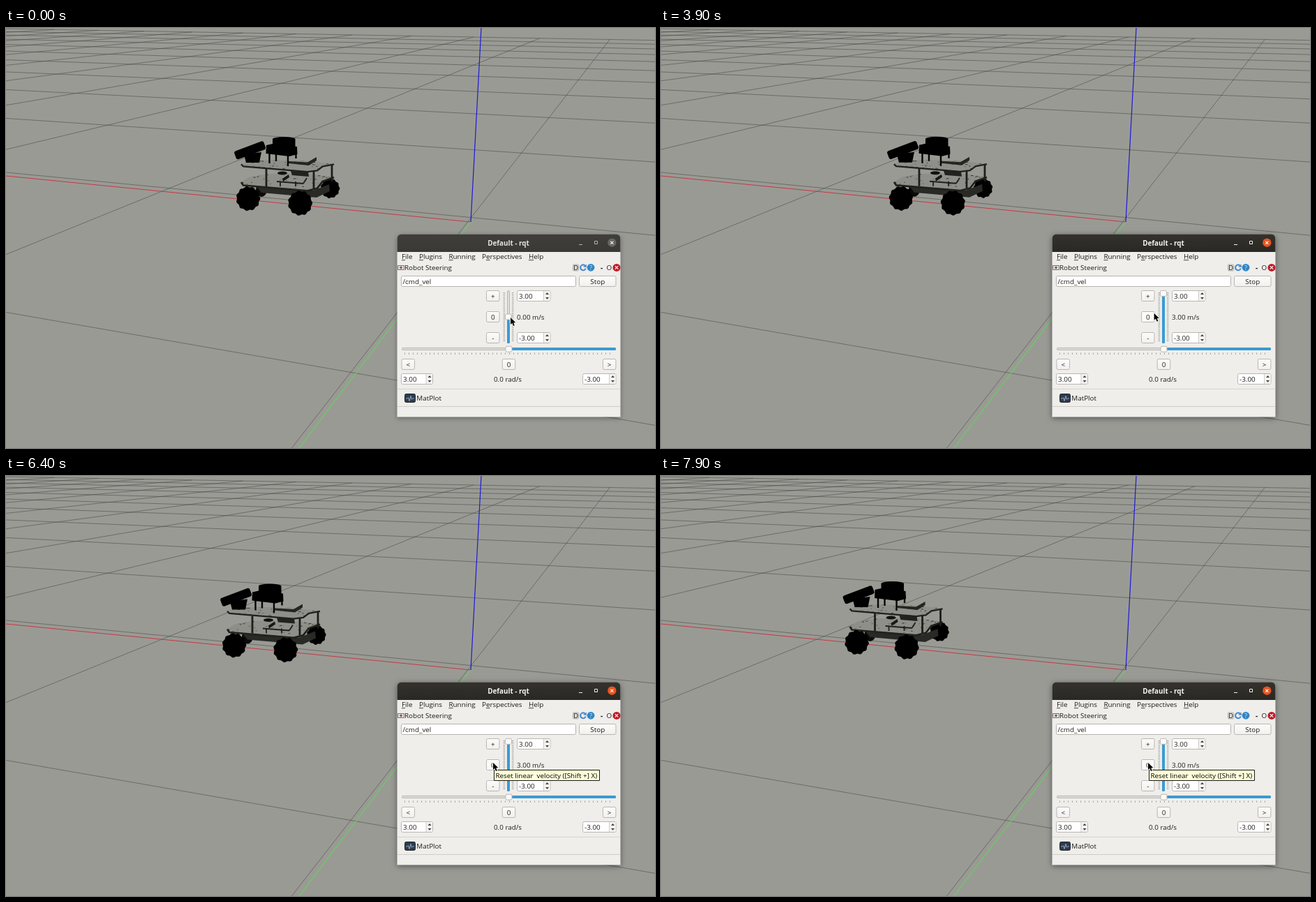
Animation of 930x602 px, one loop 8 s. Source, as an HTML page with a canvas:

```html
<!DOCTYPE html>
<html lang="en">
<head>
<meta charset="utf-8">
<title>Robot steering</title>
<style>
html, body { margin: 0; width: 100%; height: 100%; overflow: hidden; background: #9a9a95; }
canvas { display: block; }
</style>
</head>
<body>
<canvas id="stage" width="930" height="602"></canvas>
<script>
const g = document.getElementById('stage').getContext('2d');
const LOOP = 8000;
const BODY = '#efeeeb', BLUE = '#3a9bd2', INK = '#1c1c18', EDGE = '#b9b7b2';

const ramp = (t, from, to) => Math.min(1, Math.max(0, (t - from) / (to - from)));
const mix = (a, b, k) => a + (b - a) * k;

// creeps forward as a cubic, then cruises while losing pace
function driveAt(t) {
  const s = t / 1000, u = s - 6.4;
  return u < 0 ? -.0513 * s ** 3 : -(20 + 43.2 * u - 8.15 * u * u);
}

const speedAt = t => t < 2400 ? 2.7 * ramp(t, 1100, 1300) : 3;

// drags the slider, lets go, then glides to the zero button
function pointerAt(t) {
  if (t < 3400) {
    const v = speedAt(t);
    return [723 - 2 * v, 415 - 11 * v];
  }
  if (t < 3700) return [723, 406];
  const k = ramp(t, 3800, 4500);
  return [mix(708, 698, k), mix(408.5, 411, k)];
}

function line(x1, y1, x2, y2, color, width = 1) {
  g.strokeStyle = color;
  g.lineWidth = width;
  g.beginPath();
  g.moveTo(x1, y1);
  g.lineTo(x2, y2);
  g.stroke();
}

function trace(points) {
  g.beginPath();
  for (const [x, y] of points) g.lineTo(x, y);
}

function poly(color, ...points) {
  trace(points);
  g.closePath();
  g.fillStyle = color;
  g.fill();
}

function box(x, y, w, h, fill, stroke, r = 0) {
  g.beginPath();
  g.roundRect(x, y, w, h, r);
  if (fill) { g.fillStyle = fill; g.fill(); }
  if (stroke) { g.strokeStyle = stroke; g.lineWidth = 1; g.stroke(); }
}

function disc(x, y, rx, ry, color) {
  g.beginPath();
  g.ellipse(x, y, rx, ry, 0, 0, 7);
  g.fillStyle = color;
  g.fill();
}

function text(s, x, y, { color = INK, align = 'left', weight = 500, size = 9.85 } = {}) {
  g.font = `${weight} ${size}px "Open Sans", "Noto Sans", sans-serif`;
  g.textAlign = align;
  g.fillStyle = color;
  g.fillText(s, x, y);
  return g.measureText(s).width;
}

function cross(x, y, r, color) {
  line(x - r, y - r, x + r, y + r, color, 1.2);
  line(x - r, y + r, x + r, y - r, color, 1.2);
}

function fade(y, h, top, bottom) {
  const f = g.createLinearGradient(0, y, 0, y + h);
  f.addColorStop(0, top);
  f.addColorStop(1, bottom);
  return f;
}

function world() {
  g.fillStyle = '#9a9a95';
  g.fillRect(0, 0, 930, 602);
  // two families of parallel ground lines, each meeting at a point on the horizon
  const hy = -45.5, rx = 913.5, lx = -2600, far = 55.9;
  const tone = 'rgba(66,66,62,.52)';
  for (let k = -1; k <= 10; k++) {
    const n = 10.3 + 4.56 * k;
    line(0, hy - lx / n, 930, hy + (930 - lx) / n, tone);
  }
  for (let k = 0; k <= 10; k++) {
    const m = .7785 + 1.69 * k;
    const x = (rx * far + lx * m) / (far + m);
    line(0, hy + rx / m, x, hy + (rx - x) / m, tone);
  }
  line(0, 212, 666, 278, '#c43a44');
  line(420, 602, 666, 278, '#66cf62', 1.2);
  line(666, 278, 681, 0, '#1c1cd4', 1.2);
}

function wheel(x, y, r, turn) {
  g.beginPath();
  for (let i = 0; i < 72; i++) {
    const a = i / 72 * Math.PI * 2;
    const d = r * (.965 + .045 * Math.cos(11 * (a - turn)));
    g.lineTo(x + d * .98 * Math.cos(a), y + d * Math.sin(a));
  }
  g.fillStyle = '#000';
  g.fill();
}

// outline as [x, depth behind the front edge], back first, then the visible rim
const DECK = [[348, 7.7], [374, 12], [430, 15.6], [470, 14], [454, 9.7], [446, 3], [432, 0], [340, 0], [337, 2.7]];

function deck(front, depth, holes, seed) {
  const at = ([x, d]) => [x, front + (x - 340) * .085 - d * depth];
  const outline = DECK.map(at);
  poly('#8f8f89', ...outline);
  g.save();
  g.clip();
  const rnd = () => (seed = seed * 16807 % 2147483647) / 2147483647;
  for (let i = 0; i < holes; i++) {
    const [x, y] = at([338 + rnd() * 132, rnd() * 16]);
    line(x, y, x + 1 + rnd() * 3, y + rnd() - .5, rnd() < .5 ? '#22231f' : '#62625c', .8);
  }
  g.restore();
  trace(outline.slice(3));
  g.strokeStyle = '#20211d';
  g.lineWidth = 1.6 + depth * .7;
  g.stroke();
}

function robot(shift) {
  const p = -shift / 66.5, turn = shift / 17;
  g.save();
  g.translate(shift, shift * .075);
  g.lineJoin = 'round';

  wheel(464.5 + p, 230 - 2 * p, 14, turn);
  disc(366, 232, 8, 10, '#0a0a09');
  poly('#292a26', [359, 227], [440, 233], [463, 224], [464, 234], [445, 243], [366, 236]);

  deck(225.5, 1.6, 60, 77);
  disc(396, 208, 7, 2.5, '#10100f');
  poly('#21221e', [408, 205], [433, 206], [434, 213], [410, 211]);
  poly('#171815', [396, 216], [405, 210], [406, 214], [397, 220]);
  line(388, 220, 426, 223, '#20211d', 1.8);
  line(426, 223, 431, 215, '#20211d', 1.8);
  for (const x of [393, 415]) line(x, 220, x, 227, '#20211d', 1.8);

  for (const [x, y] of [[373, 202], [441, 205], [467, 195]])
    line(x, y, x, y + 25, '#1d1e1a', 2.8);

  deck(198.3, 1, 50, 431);
  poly('#24251f', [405, 191], [432, 192.5], [445, 185], [445, 190], [434, 197], [405, 194]);

  // camera
  g.save();
  g.translate(349.5, 175);
  g.rotate(-.36);
  box(-22.5, -6, 45, 12.5, '#000', null, 3);
  g.restore();
  poly('#000', [341, 181], [366, 178], [363, 193], [344, 193]);

  // scanner
  for (const [x, y] of [[377.5, 194], [387, 191], [404, 198], [415.5, 187]])
    line(x, 176, x, y, '#050505', 2.4);
  poly('#000', [373, 168], [382, 166], [417, 170], [417.5, 181], [406, 184], [372.5, 180]);
  box(382, 159, 32.5, 15, '#000');
  disc(398.2, 159, 16.2, 3, '#000');

  wheel(347, 244.5 - p, 17.6, turn);
  wheel(421.5 - 3 * p, 251 - p, 17.9, turn);
  g.restore();
}

function button(label, x, y, w = 19.5, hover = false) {
  box(x + .5, y + .5, w - 1, 15, fade(y, 16, '#fcfcfb', hover ? '#f8f8f7' : '#f1f0ee'), EDGE, 2);
  text(label, x + w / 2, y + 12, { align: 'center' });
}

function spin(label, x, y, w = 48.5) {
  box(x + .5, y + .5, w - 1, 15, '#fff', EDGE, 2);
  box(x + w - 10, y + 1, 9, 14, '#f4f3f1');
  line(x + w - 10, y + 1, x + w - 10, y + 15, '#cfcdc9');
  const ax = x + w - 5;
  for (const s of [-1, 1]) {
    const ay = y + 8 + 2 * s;
    poly('#45453f', [ax - 2.5, ay], [ax + 2.5, ay], [ax, ay + 3 * s]);
  }
  text(label, x + 3, y + 12);
}

function dots(x1, y1, x2, y2, width, dash) {
  g.setLineDash(dash);
  line(x1, y1, x2, y2, '#a8a6a1', width);
  g.setLineDash([]);
}

function frame(active) {
  g.save();
  g.shadowColor = `rgba(0,0,0,${active ? .45 : .35})`;
  g.shadowBlur = active ? 9 : 7;
  g.shadowOffsetY = 2;
  box(560.5, 295.5, 320, 262, BODY, null, [6, 6, 0, 0]);
  g.restore();
  const bar = active ? fade(296, 25, '#33322d', '#292823') : fade(296, 25, '#3f3e3a', '#3a3935');
  box(560.5, 295.5, 320, 25.5, bar, null, [6, 6, 0, 0]);
  const light = active ? '#efeeea' : '#b4b3ae';
  text('Default - rqt', 720, 311.5, { color: active ? '#f4f3ef' : '#e4e3de', align: 'center', weight: 700 });
  line(821, 310.5, 826, 310.5, light);
  box(843.5, 305.5, 4, 4, null, light);
  disc(868.3, 307.7, 6.2, 6.2, active ? '#e95420' : '#666560');
  cross(868.3, 307.7, 2.1, '#f5f4f0');
}

function menu() {
  let x = 567;
  for (const item of ['&File', '&Plugins', '&Running', 'P&erspectives', '&Help']) {
    const [before, after] = item.split('&');
    const w = text(before + after, x, 331);
    const from = x + g.measureText(before).width;
    line(from, 332.7, from + g.measureText(after[0]).width, 332.7, INK, .8);
    x += w + 9.4;
  }
}

function dockBar() {
  box(561.5, 340.5, 9, 6, '#e2e0dc', '#77756f');
  line(564, 343.5, 568, 343.5, '#b04030', 1.5);
  line(566, 341.5, 566, 345.5, '#44433e');
  text('Robot Steering', 571, 347.3);
  box(812.5, 339, 8, 9, '#dddcd8', '#b4b2ad', 1);
  text('D', 816.6, 347, { align: 'center' });
  g.beginPath();
  g.arc(827, 343.3, 3.9, .3, 5.4);
  g.strokeStyle = '#4d8fd0';
  g.lineWidth = 2.2;
  g.stroke();
  poly('#4d8fd0', [827, 342.5], [832, 343], [831.5, 338.5]);
  disc(838, 343.3, 5.4, 5.4, '#2f86c8');
  text('?', 838, 346.5, { color: '#d8ecfa', align: 'center', size: 8.5 });
  text('-', 853.5, 347, { align: 'center', weight: 700 });
  text('O', 864.3, 347.3, { align: 'center' });
  disc(875, 343.4, 5.5, 5.5, '#c01a28');
  cross(875, 343.4, 2.2, '#fff');
}

function knob(x, y) {
  box(x - 4.5, y - 4, 9, 8, '#fafaf9', '#bab8b3', 2);
}

function steering(speed, overZero) {
  box(566.5, 355.5, 250, 15, '#fff', '#b5b3ae', 2);
  text('/cmd_vel', 568.5, 367);
  button('Stop', 821, 355, 53.5);

  ['+', '0', '-'].forEach((s, i) => button(s, 688, 376 + 30 * i, 19.5, overZero && i === 1));
  spin('3.00', 732, 376);
  spin('-3.00', 732, 436);
  text(speed.toFixed(2) + ' m/s', 732, 417.5);

  const y = 414 - speed * 11.2;
  box(718.5, 376.5, 3, 75, '#deddd9', EDGE, 1.5);
  box(718, y, 4, 452 - y, BLUE, null, 1.5);
  for (const x of [713.8, 726.2]) dots(x, 379, x, 449, 2.6, [1, 1.3]);
  knob(720, y);

  box(567.5, 458.5, 306, 3, '#deddd9', EDGE, 1.5);
  box(720, 458, 154, 4, BLUE, null, 1.5);
  dots(571, 466.7, 871, 466.7, 2.4, [1, 5]);
  knob(720.5, 460.2);

  ['<', '0', '>'].forEach((s, i) => button(s, 566.5 + 144.2 * i, 474));
  spin('3.00', 566, 495, 46);
  spin('-3.00', 826, 495);
  text('0.0 rad/s', 719, 507, { align: 'center' });
}

function plotTab() {
  line(561, 517.5, 880, 517.5, '#d6d4d0');
  line(561, 542.5, 880, 542.5, '#cfcdc9');
  box(571.5, 524.5, 15, 12, '#313a46', '#20262e', 2);
  g.beginPath();
  for (let x = -6; x <= 6; x += .5) g.lineTo(579 + x, 531 - 4 * Math.sin(x * 1.5) * Math.exp(-x * x / 8));
  g.strokeStyle = '#8fb9e6';
  g.lineWidth = 1;
  g.stroke();
  text('MatPlot', 588.3, 534);
}

function tooltip(alpha) {
  g.save();
  g.globalAlpha = alpha;
  box(699.5, 421.5, 151, 15, '#ffffdc', '#1a1a16');
  text('Reset linear\u00a0 velocity ([Shift +] X)', 701.5, 432.7, { color: '#000' });
  g.restore();
}

function cursor(x, y) {
  g.save();
  g.translate(x, y);
  g.lineJoin = 'round';
  trace([[0, 0], [0, 10], [2.3, 8], [4, 12], [5.8, 11.2], [4.2, 7.4], [7.3, 7.2]]);
  g.closePath();
  g.strokeStyle = '#fff';
  g.lineWidth = 1.6;
  g.stroke();
  g.fillStyle = '#000';
  g.fill();
  g.restore();
}

function draw(now) {
  const t = Math.floor(now % LOOP / 100) * 100;
  world();
  robot(driveAt(t));
  frame(t >= 1100);
  menu();
  dockBar();
  steering(speedAt(t), t >= 3700);
  plotTab();
  if (t >= 5100) tooltip(ramp(t, 5000, 5300));
  cursor(...pointerAt(t));
}

const start = performance.now();
function tick() {
  draw(performance.now() - start);
  requestAnimationFrame(tick);
}
tick();
</script>
</body>
</html>
```
